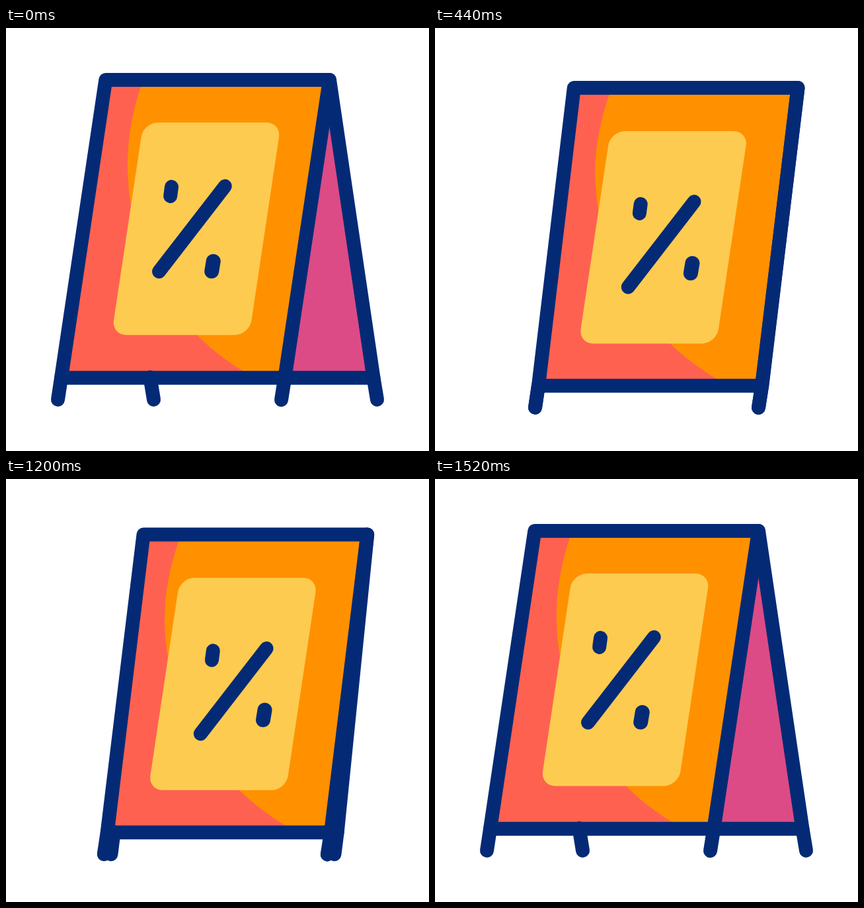
These frames come from a looping animation (640 px wide and 640 px high, 2 s). An HTML page with a canvas:

```html
<!DOCTYPE html>
<html lang="en">
<head>
<meta charset="utf-8">
<title>Sale board</title>
<style>
  html, body { margin: 0; width: 100%; height: 100%; overflow: hidden; background: #fff; }
  canvas { display: block; width: 640px; height: 640px; }
</style>
</head>
<body>
<canvas id="stage"></canvas>
<script>
const LOOP = 2000, STEP = 40, WIDTH = 21;
const NAVY = '#042a76', ORANGE = '#ff9100', RED = '#ff6150', YELLOW = '#fdcb50', PINK = '#dc4b85';

const canvas = document.getElementById('stage');
const ctx = canvas.getContext('2d');
const ratio = window.devicePixelRatio || 1;
canvas.width = canvas.height = 640 * ratio;

const ease = u => u * u * (3 - 2 * u);

// Eased value at time t from [time, value] pairs.
function key(t, ...keys) {
  if (t <= keys[0][0]) return keys[0][1];
  for (let i = 1; i < keys.length; i++) {
    const [t0, v0] = keys[i - 1], [t1, v1] = keys[i];
    if (t < t1) return v0 + (v1 - v0) * ease((t - t0) / (t1 - t0));
  }
  return keys[keys.length - 1][1];
}

// Goes to v between a and b, holds, and returns between c and d.
const there = (t, v, a, b, c = 1160, d = 1400) => key(t, [a, 0], [b, v], [c, v], [d, 0]);
// Vertical travel: settle down, hop up, land.
const drop = (t, a, b) => key(t, [a, 0], [b, 12], [1160, 12], [1320, -29.5], [1500, 0]);

function trace(points, close) {
  ctx.beginPath();
  points.forEach(([x, y]) => ctx.lineTo(x, y));
  if (close) ctx.closePath();
}

function fill(points, color) {
  trace(points, true);
  ctx.fillStyle = color;
  ctx.fill();
}

function line(points, width = WIDTH) {
  trace(points);
  ctx.lineWidth = width;
  ctx.stroke();
}

function drawBoard(t, hopX) {
  const y = drop(t, 280, 420);
  const top = hopX + there(t, 59.5, 120, 288);
  const front = hopX + key(t, [120, 0], [280, -14], [440, 73], [1160, 73], [1400, 0]);
  const backL = hopX + there(t, -72, 120, 368);
  const backR = hopX + there(t, -72, 120, 320);
  const joint = there(t, 10.5, 240, 400);

  const yTop = 78.5 + y, yBar = 529.2 + y, yFoot = 562.2 + y;
  const tl = [150.8 + top, yTop], tr = [489.5 + top, yTop];
  const bl = [83.5 + front, yBar], br = [421.8 + front, yBar];
  const back = [556 + backR + joint, yBar];

  fill([tr, br, back], PINK);
  fill([tl, tr, br, bl], RED);

  ctx.save();
  trace([tl, tr, br, bl], true);
  ctx.clip();
  const mid = top * .98, low = hopX + (front - hopX) * .92;
  ctx.beginPath();
  ctx.moveTo(204 + top, 89 + y);
  ctx.bezierCurveTo(191 + top, 127 + y, 184 + mid, 167 + y, 184 + mid, 207 + y);
  ctx.bezierCurveTo(184 + mid, 335 + y, 249 + low, 453 + y, 359 + low, 519 + y);
  ctx.lineTo(380 + low, 532 + y);
  ctx.lineTo(660, 532 + y);
  ctx.lineTo(660, 70 + y);
  ctx.lineTo(212 + top, 70 + y);
  ctx.fillStyle = ORANGE;
  ctx.fill();
  ctx.restore();

  line([[218 + backL + joint, yBar - .7], [223.5 + backL, yFoot]]);
  line([tr, back, [561.5 + backR, yFoot]]);
  line([bl, back]);
  line([[78.5 + front, yFoot], bl, tl, tr, br, [416.5 + front, yFoot + .4]]);
}

function drawCard(t, hopX) {
  const fold = there(t, 1, 120, 400);
  const slant = .15 + key(t, [120, 0], [280, .143], [400, 0]);
  ctx.save();
  ctx.transform(1, 0, -slant, 1, 288 + hopX + 57.5 * fold, 303.7 + drop(t, 120, 400) + fold);
  ctx.beginPath();
  ctx.roundRect(-104.2, -160.7, 208.4, 321.4, 22);
  ctx.fillStyle = YELLOW;
  ctx.fill();
  ctx.restore();
}

function drawBorder(t) {
  const from = key(t, [680, 0], [1160, 1]), to = key(t, [440, 0], [880, 1]);
  if (to <= from) return;
  const side = Math.hypot(43.5, 316), total = 2 * (221 + side);
  ctx.save();
  ctx.setLineDash([(to - from) * total, 2 * total]);
  ctx.lineDashOffset = -from * total;
  line([[481, 161.3], [260, 161.3], [216.5, 477.3], [437.5, 477.3], [481, 161.3]]);
  ctx.restore();
}

function drawPercent(t, hopX) {
  const x = hopX + there(t, 60.7, 120, 360, 1200, 1360);
  const y = drop(t, 200, 360) + there(t, 11.5, 200, 360, 1200, 1360);
  const bob = there(t, 1, 440, 800, 800, 1160);
  const x1 = x + key(t, [120, 0], [240, -5], [360, 0]);
  const y1 = y + there(t, 2.5, 160, 400, 1200, 1360) - 16.5 * bob;
  const x2 = x + there(t, 15, 120, 280, 1200, 1360);
  const y2 = y + there(t, -20.5, 160, 400, 1200, 1360) + 42.5 * bob;
  line([[331.3 + x, 239.3 + y], [231.5 + x, 368.5 + y]]);
  line([[250.5 + x1, 240.3 + y1], [248.6 + x1, 254.5 + y1]]);
  line([[313.7 + x2, 353 + y2], [311.2 + x2, 368 + y2]], 22);
}

function draw(t) {
  const hopX = key(t, [1160, 0], [1320, 13.5], [1500, 0]);
  ctx.setTransform(ratio, 0, 0, ratio, 0, 0);
  ctx.fillStyle = '#fff';
  ctx.fillRect(0, 0, 640, 640);
  ctx.strokeStyle = NAVY;
  ctx.lineCap = ctx.lineJoin = 'round';
  drawBoard(t, hopX);
  drawCard(t, hopX);
  drawBorder(t);
  drawPercent(t, hopX);
}

const start = performance.now();
function tick() {
  const t = (performance.now() - start) % LOOP;
  draw(Math.floor(t / STEP) * STEP);
  requestAnimationFrame(tick);
}
tick();
</script>
</body>
</html>
```
